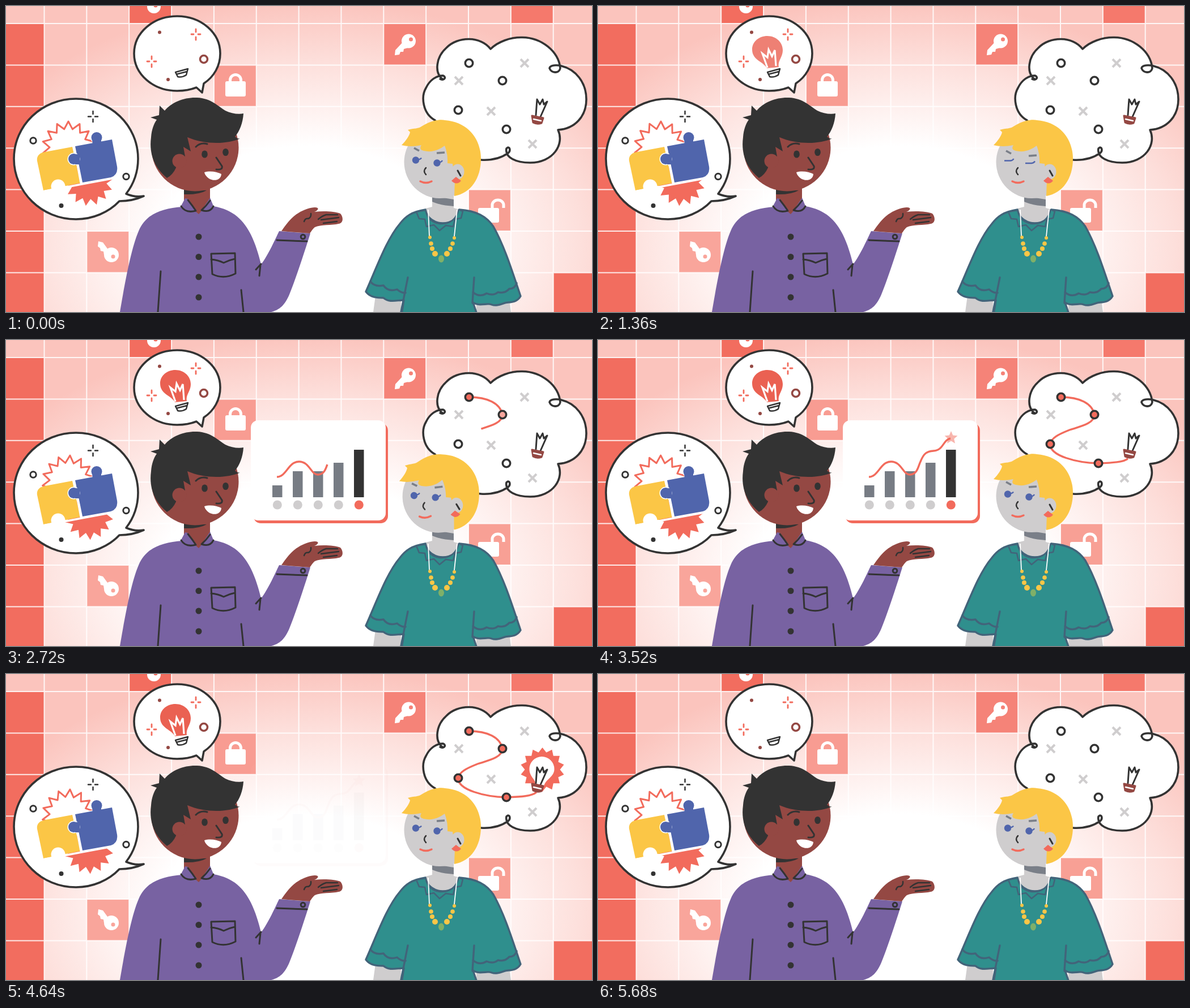
Animation of 1034 by 541 pixels, one loop 5760 ms. Source, as an HTML page:

```html
<!DOCTYPE html>
<html lang="en">
<head>
<meta charset="utf-8">
<title>Conversation</title>
<style>
  html, body { margin: 0; width: 100%; height: 100%; overflow: hidden; background: #fff; }
  svg { display: block; width: 100vw; height: 100vh; }
  .ink { fill: none; stroke: #333; stroke-width: 3; stroke-linecap: round; stroke-linejoin: round; }
  .fine { stroke-width: 2.5; }
  .bubble { fill: #fff; stroke: #333; stroke-width: 3.6; stroke-linejoin: round; }
  .red { fill: #f26b5c; }
  .redline { fill: none; stroke: #f26b5c; stroke-width: 3.4; stroke-linejoin: round; }
  .skin { fill: #944843; }
  .pale { fill: #cfcdce; }
  .shirt { fill: #7862a2; }
  .gold { fill: #fbc646; }
  .blue { fill: #5065ac; }
  .seam { fill: none; stroke: #42647a; stroke-width: 3.4; stroke-linecap: round; stroke-linejoin: round; }
  .teal { fill: #2f8f8d; stroke: #42647a; stroke-width: 3.4; stroke-linejoin: round; }
</style>
</head>
<body>
<svg viewBox="0 0 1034 541" preserveAspectRatio="none">
  <defs>
    <radialGradient id="glow" gradientUnits="userSpaceOnUse" cx="0" cy="0" r="1" gradientTransform="translate(530 420) scale(650 430)">
      <stop offset=".4" stop-color="#fff"/>
      <stop offset=".75" stop-color="#fddfdb"/>
      <stop offset="1" stop-color="#fbc4bd"/>
    </radialGradient>
  </defs>
  <rect width="1034" height="541" fill="url(#glow)"/>
  <g id="cells"></g>
  <path id="grid" fill="none" stroke="#fff" stroke-width="2" opacity=".85"/>

  <g fill="#fff">
    <circle cx="261" cy="1" r="12"/><circle cx="264" cy="-1" r="3.5" fill="#f26d5f"/>
    <rect x="387" y="133" width="36" height="27" rx="3"/>
    <path d="M395.500 134V131a9.500 9.500 0 0 1 19 0V134" fill="none" stroke="#fff" stroke-width="5"/>
    <circle cx="710.500" cy="62" r="12.500"/><circle cx="714.500" cy="59" r="3.500" fill="#f58378"/>
    <path d="M700 64L687 78L686 87L694 86L696 81L701 81L702 76L709 74Z"/>
    <circle cx="186" cy="440" r="13"/><circle cx="189" cy="443" r="3.500" fill="#f9a59b"/>
    <path d="M179 429L171 418L163 416L162 425L166 428L167 433L172 434L173 440L180 443Z"/>
    <rect x="833" y="357" width="37" height="26" rx="3"/>
    <path d="M858 358V352a10 9 0 0 1 20 0V357" fill="none" stroke="#fff" stroke-width="5"/>
  </g>

  <!-- puzzle bubble -->
  <path class="bubble" d="M212 332C225 315 233 293 233 270C233 211 184 164 123.500 164S14 211 14 270S63 377 123.500 377C153 377 181 365 200 345C216 345 232 341 243 336C232 338 221 336 212 332Z"/>
  <path id="ring" class="redline" style="stroke-width:3"/>
  <path id="fan" class="red"/>
  <path class="gold" d="M69 258L117 249L131 313L66 326L55 274Q53 261 69 258Z"/>
  <circle cx="92" cy="319" r="12.500" fill="#fff"/>
  <path d="M119.500 245L133 316" stroke="#fff" stroke-width="4"/>
  <path d="M63 328.500L131 315.500L190 304.500" fill="none" stroke="#fff" stroke-width="3.500"/>
  <g class="blue" stroke="#fff" stroke-width="3" paint-order="stroke">
    <circle cx="160" cy="232.500" r="9.500"/>
    <path d="M122 248L187 236L196 284Q198 299 185 303L135 312Z"/>
    <circle cx="119.500" cy="270.500" r="9.500"/>
    <path stroke="none" d="M122 262L130 262L130 280L122 280ZM152 236L168 233L168 244L153 246Z"/>
  </g>
  <path class="ink fine" d="M153.500 186v5M153.500 200v5M145 195.500h5M157 195.500h5"/>
  <circle class="ink" cx="48" cy="238" r="5.200"/>
  <circle class="ink" cx="212" cy="301.500" r="5.200"/>
  <circle cx="97.500" cy="353" r="4" fill="#333"/>

  <!-- idea bubble -->
  <path class="bubble" d="M349 137C367 125 378 106 378 84C378 47 344 18 302 18S226 47 226 84S260 150 302 150C315 150 326 148 336 144L346 153Z"/>
  <g id="idea" fill="#ea6152">
    <path d="M298 110C292 98 272 96 272 77C272 63 284 53 299 53S326 64 326 78C326 91 317 96 319 108Z"/>
    <path d="M299 109L290 84L299 91L301 77L307 89L312 78L314 106" fill="none" stroke="#fff" stroke-width="3.200"/>
  </g>
  <path class="ink fine" d="M299 117L321 111L318 122Q310 127 303 125ZM301.500 120.500L319 116"/>
  <g class="skin"><circle cx="271" cy="46.500" r="3"/><circle cx="286" cy="130" r="3"/></g>
  <circle cx="349" cy="94" r="6.500" fill="#fff" stroke="#944843" stroke-width="3.600"/>
  <path class="redline" stroke-linecap="round" d="M335 41v5M335 55v5M327 50h4M339 50h4M257 89v5M257 103v5M249 98h4M261 98h4" style="stroke-width:2.800"/>

  <!-- thought cloud -->
  <path class="bubble" d="M771 130C755 118 759 90 777 74C797 53 838 53 855 76C868 63 890 55 911 55.500C945 56 975 80 978 110C976 120 962 119 959 110C960 104 972 104 980 106C1005 112 1024 135 1024 165C1024 195 1004 217 974 219C986 245 965 277 925 277C900 277 880 268 883 252C889 246 891 256 886 260C872 270 855 273 838 272C800 270 775 230 757 202C735 190 732 160 741 145C748 130 760 123 771 123C779 126 771 134 765 128"/>
  <path id="crosses" fill="none" stroke="#cfcdce" stroke-width="4"/>
  <g id="spark">
    <path id="sun" class="red"/>
    <path fill="#fff" d="M934 195C935 186 923.500 182 923.500 168A22 22 0 0 1 967.500 168C967.500 182 953 185 949 198Z"/>
  </g>
  <path id="route" class="redline" pathLength="1" d="M817 101C850 101 872 112 876 132C876 148 850 153 832 159C812 167 800 173 798 184C797 205 845 217 883 218C910 217 928 216 936 209"/>
  <g id="stops"></g>
  <path class="ink" d="M935 193L937 165L942 174L947 165L949 174L955 169L943 196"/>
  <path d="M928 194L948 198L945 207Q937 210 930 206Z" fill="#944843" stroke="#944843" stroke-width="3" stroke-linejoin="round"/>
  <path d="M931 200L944 203" stroke="#fff" stroke-width="2.500" stroke-linecap="round"/>

  <!-- chart card -->
  <g id="card">
    <rect class="red" x="436.500" y="147" width="237.500" height="177" rx="13"/>
    <rect x="432" y="142" width="238" height="177" rx="13" fill="#fff"/>
    <g id="bars"></g>
    <path id="trend" class="redline" pathLength="1" d="M478 242C495 242 498 215 517 215S538 239 551 238S565 223 569 215C575 200 580 197 592 196C610 195 608 177 622 174"/>
    <path id="star" class="red"/>
  </g>

  <!-- man -->
  <g>
    <path class="shirt" d="M201 541C208 500 220 430 234 398C246 370 270 358 312 355L366 354C402 360 420 380 432 404C440 420 446 440 450 457C463 440 475 412 482 398L537 402C525 440 512 480 500 510C492 529 483 537 468 541Z"/>
    <path class="skin" d="M314 320H360V345L340 368L314 345Z"/>
    <path fill="#333" d="M314 325L354 326Q340 334 314 333Z"/>
    <path class="shirt" d="M316 340L307 357Q321 368 337 362L321 341ZM360 339L367 356Q357 366 344 363Z"/>
    <path class="ink" d="M321 343Q329 353 335 362Q317 367 309 354M360 344Q353 354 345 361Q360 366 366 354"/>
    <path class="skin" d="M486 398C495 385 505 372 516 366C525 360 538 356 545 356C553 356 552 361 544 364C560 362 580 363 590 367C596 374 595 384 587 385C575 388 555 386 545 391C540 395 538 400 536 402Z"/>
    <path class="ink fine" d="M526 381Q528 375 533 376Q539 374 538 367M551 377Q558 371 565 369L585 369M556 378L587 374M560 384L584 381"/>
    <path class="ink" d="M478 414L531 416M273 469L268 541M415 502L419 541M441 466L450 456M449 457L447 477"/>
    <circle class="ink" cx="524" cy="408" r="3.800"/>
    <g id="buttons" fill="#333"></g>
    <path class="ink" d="M362 438L404 437L405 473Q384 484 364 474ZM362 448Q374 449 384 454Q394 449 404 447"/>
    <circle class="skin" cx="333.500" cy="250.500" r="77"/>
    <path fill="#333" d="M284 304C262 286 252 262 256 232C257 218 261 208 266 201L255 197L270 193L271 176L280 185C292 170 315 161 337 162C362 163 375 178 387 185C397 190 410 192 419 190C418 207 412 222 404 231Q409 236 414 234C390 245 350 245 320 232L326 257L313 249L316 266L300 264V286Q294 299 284 304Z"/>
    <circle class="skin" cx="306" cy="274" r="12.500"/>
    <ellipse cx="350.500" cy="262" rx="5.300" ry="6.600" fill="#333"/>
    <ellipse cx="387.500" cy="258.500" rx="5.300" ry="6.600" fill="#333"/>
    <path class="ink" d="M335 249C341 243 348 242 355 244M371 268L381 283Q383 290 371 289"/>
    <path fill="#fff" d="M350 294C360 291 372 293 380 297C379 309 366 310 358 305C353 301 351 298 350 294Z"/>
  </g>

  <!-- woman -->
  <g>
    <path class="pale" d="M652 512H697V541H648ZM830 520H888L891 541H830ZM740 358L752 355V332H790V357L800 360L790 392H745Z"/>
    <path fill="#7a7f88" d="M752 336L790 342V354Q768 353 752 346Z"/>
    <path class="teal" d="M740 360C715 364 705 372 695 385C672 412 655 460 635 505C643 516 657 516 666 516C676 525 690 520 702 520L698 545H831L824 524C835 532 850 524 857 528C868 532 878 524 886 524C896 524 904 520 908 513C895 475 880 425 860 390C848 372 830 362 800 360C796 392 746 392 740 360Z"/>
    <path class="teal" d="M740 361L724 364L729 376L739 377L742 390L755 387L765 397L776 388L789 390L792 377L803 375L806 363L799 360Q792 385 769 385Q746 385 740 361Z" style="stroke-width:2.600"/>
    <path class="seam" d="M709 480L697 541M826 480L823 525M643 487Q650 497 666 494Q674 506 690 501Q698 508 705 507M824 506Q835 516 848 508Q860 513 868 506Q880 509 888 500Q898 500 901 490"/>
    <path d="M745 360L747 407M796 360L791 407" stroke="#fff" stroke-width="1.800"/>
    <g id="beads" class="gold"></g>
    <ellipse cx="768" cy="447" rx="5" ry="6.500" fill="#7fb069"/>
    <g id="head">
      <ellipse class="pale" cx="766" cy="276" rx="63.500" ry="64"/>
      <path id="brows" d="M720 251L729 256M760 260L774 259" stroke="#7a7f88" stroke-width="3.600"/>
      <path class="gold" d="M698 246C706 238 712 229 713 223L709 219C720 216 728 217 733 213C750 202 765 200 775 202C815 205 838 235 838 270C838 305 820 331 791 336L792 308L788 279L779 278Q780 262 774 247C762 256 750 259 737 256C729 254 731 249 733 246Q714 250 698 246Z"/>
      <ellipse class="pale" cx="797" cy="293" rx="11.500" ry="13.500"/>
      <path class="ink" d="M797 291L802 300"/>
      <path class="red" d="M786 309L794 302L803 309Q795 318 786 309Z"/>
      <g id="open" class="blue">
        <circle cx="723" cy="272.500" r="6.200"/><circle cx="760.500" cy="277.500" r="6.200"/>
        <path d="M726 271Q731 272 733 268.500M763 276Q768 277 770 273" fill="none" stroke="#5065ac" stroke-width="2.200"/>
      </g>
      <path id="shut" d="M717 273.500L728 273.500Q732 273 733.500 270M754 278L765 278Q769 277.500 771 274.500" fill="none" stroke="#5065ac" stroke-width="2.400"/>
      <path class="ink fine" d="M741 286Q735 292 741 298"/>
      <path class="redline" stroke-linecap="round" d="M731 310Q741 315 751 310"/>
    </g>
  </g>
</svg>
<script>
const LOOP = 5760, STEP = 80, SWAY = 480;
const $ = id => document.getElementById(id);
const clamp = x => Math.max(0, Math.min(1, x));
const ramp = (t, a, b) => clamp((t - a) / (b - a));
const set = (id, name, value) => $(id).setAttribute(name, value);

function add(parent, tag, attrs) {
  const el = document.createElementNS("http://www.w3.org/2000/svg", tag);
  for (const k in attrs) el.setAttribute(k, attrs[k]);
  return $(parent).appendChild(el);
}

// closed star: n spikes, first one pointing at angle a (degrees)
function burst(cx, cy, n, outer, inner, a) {
  let d = "";
  for (let i = 0; i < 2 * n; i++) {
    const r = i % 2 ? inner : outer, w = (a + i * 180 / n) * Math.PI / 180;
    d += (i ? "L" : "M") + (cx + r * Math.cos(w)).toFixed(2) + " " + (cy + r * Math.sin(w)).toFixed(2);
  }
  return d + "Z";
}

// background grid and tinted cells
const gx = i => 67.5 + 74.85 * i, gy = i => 31 + 73.4 * i;
let grid = "";
for (let i = 0; i < 13; i++) grid += `M${gx(i)} 0V541`;
for (let i = 0; i < 7; i++) grid += `M0 ${gy(i)}H1034`;
set("grid", "d", grid);
[[2, -1, "#f26d5f"], [11, -1, "#f5796c"], [8, 0, "#f58378"], [4, 1, "#f89c92"],
 [10, 4, "#f8a095"], [1, 5, "#f9a59b"], [12, 6, "#f26d5f"]].forEach(([c, r, fill]) =>
  add("cells", "rect", { x: gx(c), y: gy(r), width: 74.85, height: 73.4, fill }));
add("cells", "rect", { x: 0, y: 31, width: 67.5, height: 510, fill: "#f26d5f" });

[408, 443.5, 479, 515].forEach(cy => add("buttons", "circle", { cx: 340, cy, r: 5.5 }));
[[748, 409, 3], [750, 420, 3.8], [752, 429, 4], [757, 438, 5],
 [778, 438, 5], [784, 429, 4], [788, 420, 3.8], [791, 410, 3]].forEach(([cx, cy, r]) =>
  add("beads", "circle", { cx, cy, r }));

set("crosses", "d", [[915, 101], [799, 132], [856, 186], [929, 244]]
  .map(([x, y]) => `M${x - 7} ${y - 7}l14 14m0 -14l-14 14`).join(""));

[257, 232, 232, 217, 194].forEach((y, i) => {
  const x = 470 + 36 * i, last = i === 4;
  add("bars", "rect", { x, y, width: 17.5, height: 278 - y, fill: last ? "#333" : "#777c84" });
  add("bars", "circle", { cx: x + 8.8, cy: 291.5, r: 8, fill: last ? "#f26b5c" : "#cfcdce" });
});
set("star", "d", burst(623, 173, 5, 12, 5.5, -90));
set("sun", "d", burst(946.5, 169, 14, 39, 31, -90));

// route stops: x, y, start and end of their fill
const stops = [[817, 101, 2400, 2560], [876, 132, 2600, 2800], [798, 184, 2760, 2960], [883, 218, 3020, 3220]]
  .map(([cx, cy, a, b]) => {
    add("stops", "circle", { cx, cy, r: 6.5, fill: "#fff" });
    const dot = add("stops", "circle", { cx, cy, r: 6.5, fill: "#f26b5c" });
    add("stops", "circle", { cx, cy, r: 6.7, class: "ink", style: "stroke-width:3.6" });
    return { dot, a, b };
  });

function trace(id, p) {
  set(id, "stroke-dasharray", `${p} 2`);
  set(id, "visibility", p > 0 ? "visible" : "hidden");
}

function draw(t) {
  // quick repeated sway of the bursts around the puzzle
  const sway = ((1 + Math.cos(2 * Math.PI * (t / SWAY - 0.6))) / 2) ** 2;
  set("ring", "d", burst(110, 250, 14, 46, 33, -90 + 4 * sway));
  set("fan", "d", burst(146, 310, 14, 43.5, 31.5, 97 - 11.5 * sway));

  const out = 1 - ramp(t, 5080, 5600);
  set("idea", "opacity", ramp(t, 800, 1500) * out);

  const shut = t >= 1360 && t < 1600;
  set("open", "visibility", shut ? "hidden" : "visible");
  set("shut", "visibility", shut ? "visible" : "hidden");
  set("brows", "transform", `translate(0 ${shut ? 5 : 0})`);
  const tilt = ramp(t, 2590, 2720) - ramp(t, 3040, 3220);
  set("head", "transform", `rotate(${-2.4 * tilt} 780 345)`);

  const show = ramp(t, 1920, 2160) - ramp(t, 4400, 4645);
  set("card", "opacity", show);
  set("card", "transform", `translate(0 ${16 * (1 - show)})`);
  trace("trend", ramp(t, 2320, 2980));
  set("star", "opacity", ramp(t, 3360, 3680));

  const fade = 1 - ramp(t, 5160, 5600);
  trace("route", 1 - (1 - ramp(t, 2555, 3705)) ** 3);
  set("route", "opacity", fade);
  stops.forEach(s => s.dot.setAttribute("opacity", ramp(t, s.a, s.b) * fade));
  set("spark", "opacity", ramp(t, 3640, 4000) * fade);
}

const start = performance.now();
function tick() {
  const t = (performance.now() - start) % LOOP;
  draw(Math.floor(t / STEP) * STEP);
  requestAnimationFrame(tick);
}
tick();
</script>
</body>
</html>
```
